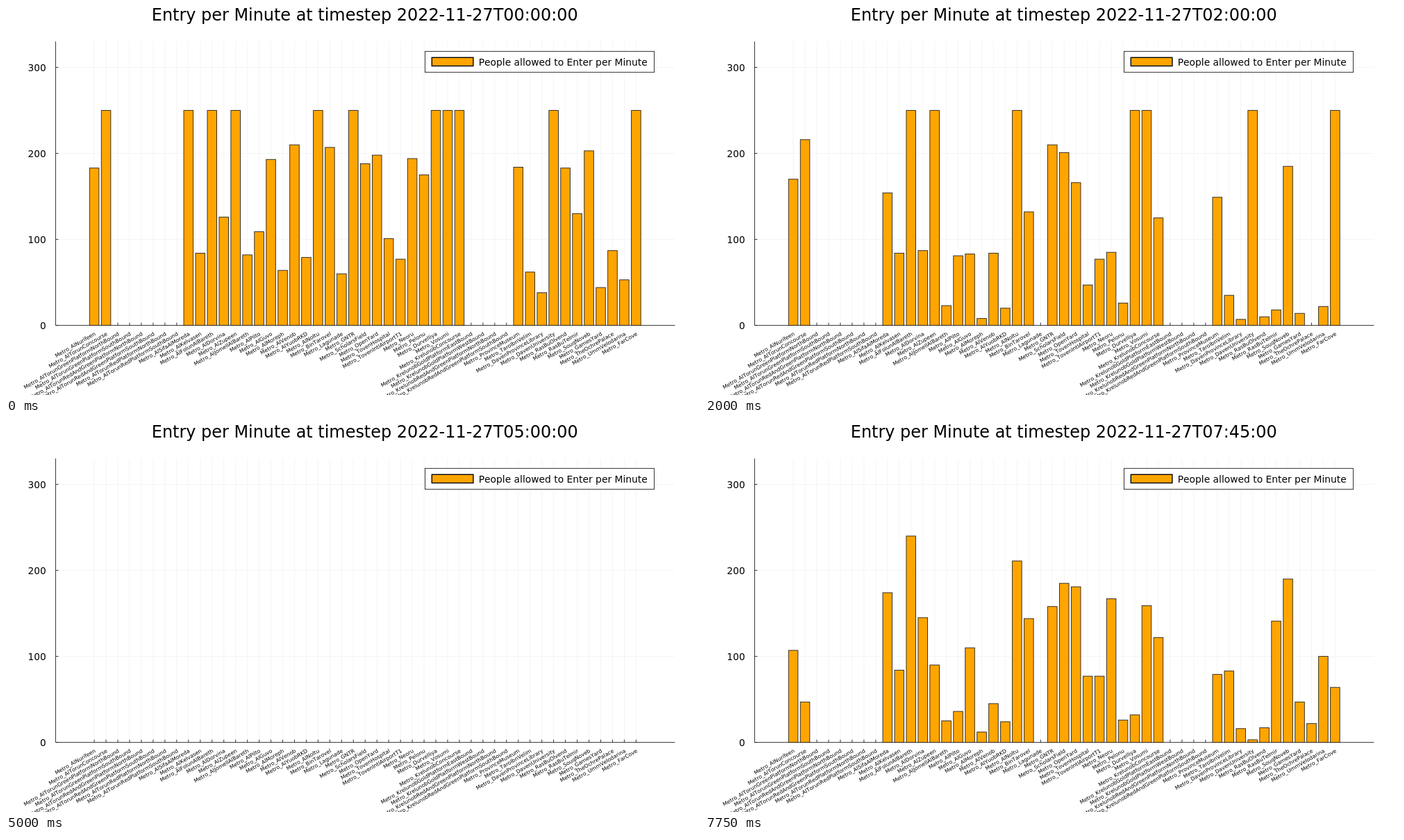
Animation, 998 px wide and 561 px high, one loop 8000 ms. Source, as an HTML page with a canvas:

```html
<!DOCTYPE html>
<html lang="en">
<head>
<meta charset="utf-8">
<title>Entry per Minute</title>
<style>
  html, body { margin: 0; width: 100%; height: 100%; overflow: hidden; background: #fff; }
  canvas { display: block; }
</style>
</head>
<body>
<canvas id="chart" width="998" height="561"></canvas>
<script>
const ctx = document.getElementById('chart').getContext('2d');
const STEP_MS = 250, STEPS = 32;
const LEFT = 71.5, RIGHT = 963.4, TOP = 51.2, BASE = 460.6;
const FIRST_X = 127.1, GAP = 16.963, BAR = GAP * 0.8;
const ORANGE = '#ffa500', INK = '#222';

// Levels of a station at these steps; service pauses between CLOSE and OPEN.
const KEYS = [0, 3, 8, 24, 27, 31];
const CLOSE = 12, OPEN = 24, PLATEAU_END = 5;

const stations = [];
const station = (name, ...levels) => stations.push({ name: 'Metro_' + name, levels });
const platforms = (place, ...kinds) =>
  kinds.forEach(kind => station(place + kind.replace('-', 'Platform') + 'Bound'));

station('AlNurifeen', 183, 183, 170, 8, 82, 107);
station('AlTorunConcourse', 250, 250, 216, 8, 9, 47);
platforms('AlTorun', 'Green-North', 'Green-South', 'RedAndGreen-North',
  'RedAndGreen-South', 'Red-North', 'Red-South');
station('AlSifaAlMoreda', 250, 250, 154, 25, 115, 174);
station('AlKelvasen', 84, 84, 84, 25, 84, 84);
station('AlFolunAlBareth', 250, 250, 250, 30, 120, 240);
station('AlDorvina', 126, 96, 87, 0, 90, 145);
station('AlZupeen', 250, 250, 250, 3, 69, 90);
station('AlJomellAlBareth', 82, 31, 23, 0, 28, 25);
station('AlPilto', 109, 158, 81, 1, 18, 36);
station('AlGuvo', 193, 93, 83, 9, 70, 110);
station('AlMoreph', 64, 21, 8, 0, 1, 12);
station('AlVenob', 210, 129, 84, 0, 34, 45);
station('AlYuobRKD', 79, 19, 20, 0, 11, 24);
station('AlNoltu', 250, 250, 250, 1, 91, 211);
station('BinTarovel', 207, 215, 132, 10, 100, 144);
station('Lagunade', 60, 0, 0, 0, 0, 0);
station('GNTR', 250, 196, 210, 4, 87, 158);
station('ScholarsField', 188, 199, 201, 1, 66, 185);
station('OpenYard', 198, 144, 166, 3, 93, 181);
station('TovenHospital', 101, 85, 47, 1, 53, 77);
station('TovenIntlAirportT1', 77, 77, 77, 30, 76, 77);
station('Neoru', 194, 168, 85, 10, 90, 167);
station('Pelonu', 175, 29, 26, 2, 4, 26);
station('Durvelliya', 250, 250, 250, 0, 18, 32);
station('Vosumi', 250, 250, 250, 0, 67, 159);
station('KrelunobConcourse', 250, 250, 125, 15, 91, 122);
platforms('Krelunob', 'Gold-East', 'Gold-West', 'RedAndGreen-North', 'RedAndGreen-South');
station('ProvinceMuseum', 184, 183, 149, 17, 57, 79);
station('TaroIbnVelim', 62, 76, 35, 3, 41, 83);
station('DavenProvinceLibrary', 38, 16, 7, 0, 1, 16);
station('DavenUniversity', 250, 194, 250, 0, 0, 3);
station('RasBuOlvend', 183, 183, 10, 0, 23, 17);
station('RasBuTelmir', 130, 30, 18, 0, 43, 141);
station('SouqNoveb', 203, 192, 185, 30, 120, 190);
station('GamesYard', 44, 0, 14, 1, 15, 47);
station('TheOchrePalace', 87, 40, 0, 0, 11, 22);
station('UmmVelodarina', 53, 75, 22, 1, 49, 100);
station('FarCove', 250, 250, 250, 4, 24, 64);

const tickX = i => FIRST_X + i * GAP;
const valueY = v => BASE - v * 1.24;

function levelAt(levels, step) {
  if (!levels.length || (step >= CLOSE && step < OPEN)) return 0;
  if (step >= KEYS[2] && step < CLOSE) return levels[2];
  let i = KEYS.length - 1;
  while (KEYS[i] > step) i--;
  if (i === KEYS.length - 1) return levels[i];
  // A steady level keeps its plateau a little longer.
  const start = i === 1 && levels[0] === levels[1] ? PLATEAU_END : KEYS[i];
  const part = Math.max(0, (step - start) / (KEYS[i + 1] - start));
  return Math.round(levels[i] + (levels[i + 1] - levels[i]) * part);
}

function line(x1, y1, x2, y2, color) {
  ctx.strokeStyle = color;
  ctx.lineWidth = 0.9;
  ctx.beginPath();
  ctx.moveTo(x1, y1);
  ctx.lineTo(x2, y2);
  ctx.stroke();
}

function box(x, y, w, h, fill, width, stroke) {
  ctx.fillStyle = fill;
  ctx.fillRect(x, y, w, h);
  ctx.strokeStyle = stroke;
  ctx.lineWidth = width;
  ctx.strokeRect(x, y, w, h);
}

function label(text, x, y, size, align) {
  ctx.font = `${size}px "DejaVu Sans", sans-serif`;
  ctx.fontKerning = 'none';
  ctx.textAlign = align;
  ctx.fillStyle = '#000';
  ctx.fillText(text, x, y);
}

function drawAxes() {
  const grid = '#f3f3f3';
  stations.forEach((s, i) => line(tickX(i), TOP, tickX(i), BASE, grid));
  for (let v = 0; v <= 300; v += 100) line(LEFT, valueY(v), RIGHT, valueY(v), grid);

  line(LEFT, BASE, RIGHT, BASE, INK);
  line(LEFT, TOP, LEFT, BASE, INK);
  for (let v = 0; v <= 300; v += 100) {
    line(LEFT, valueY(v), LEFT + 4, valueY(v), INK);
    label(v, 57.6, valueY(v) + 5.1, 13.7, 'right');
  }
  stations.forEach((s, i) => {
    line(tickX(i), BASE, tickX(i), BASE - 4, INK);
    ctx.save();
    ctx.translate(tickX(i) + 2.5, 474.3);
    ctx.rotate(-Math.PI / 6);
    label(s.name, 0, 0, 7.65, 'right');
    ctx.restore();
  });
}

function drawLegend() {
  box(603.5, 65.4, 330, 30.2, '#fff', 0.9, INK);
  box(613.3, 74.3, 59.6, 12.2, ORANGE, 1.4, '#000');
  label('People allowed to Enter per Minute', 680.7, 85.6, 13.85, 'left');
}

function draw(step) {
  ctx.fillStyle = '#fff';
  ctx.fillRect(0, 0, 998, 561);
  drawAxes();
  stations.forEach(({ levels }, i) => {
    const level = levelAt(levels, step);
    if (level) box(tickX(i) - BAR / 2, valueY(level), BAR, level * 1.24, ORANGE, 0.9, INK);
  });
  drawLegend();
  const two = n => String(n).padStart(2, '0');
  const clock = `${two(Math.floor(step / 4))}:${two(step % 4 * 15)}:00`;
  label(`Entry per Minute at timestep 2022-11-27T${clock}`, 516.8, 21.2, 23.93, 'center');
}

function tick() {
  draw(Math.floor(performance.now() / STEP_MS) % STEPS);
  requestAnimationFrame(tick);
}
tick();
</script>
</body>
</html>
```
